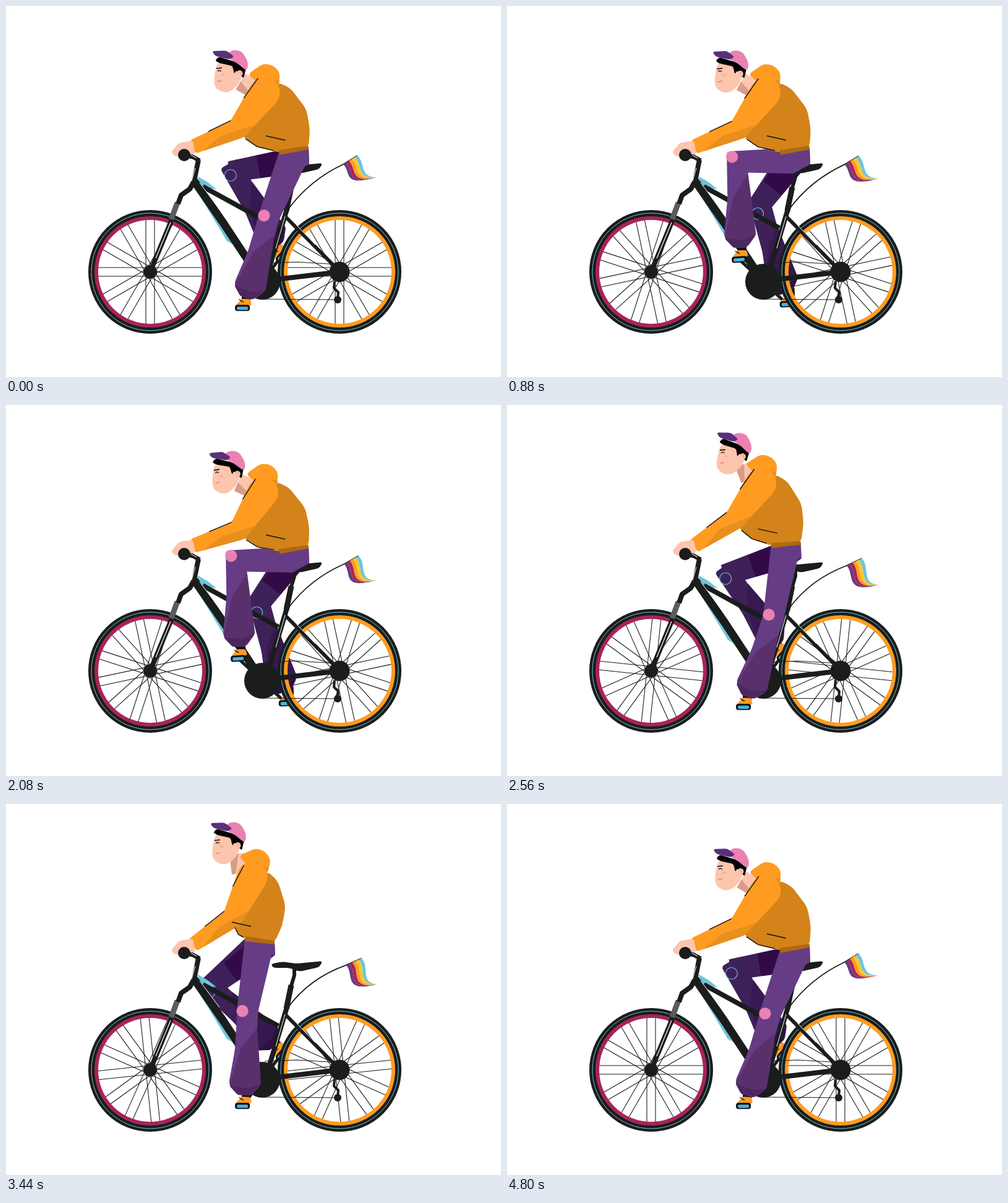
These frames come from a looping animation (800x600 px, 4.88 s). An HTML page with a canvas:

```html
<!DOCTYPE html>
<html lang="en">
<head>
<meta charset="utf-8">
<title>Cyclist</title>
<style>
html, body { margin: 0; width: 100%; height: 100%; overflow: hidden; background: #fff; }
canvas { display: block; width: 800px; height: 600px; }
</style>
</head>
<body>
<canvas id="stage" width="800" height="600"></canvas>
<script>
const ctx = document.getElementById('stage').getContext('2d');
const LOOP = 4880, STEP = 80, TAU = Math.PI * 2, RAD = Math.PI / 180;
const C = {
  black: '#1a1d1c', ink: '#111', blue: '#6cc5dd', pedal: '#45b4e6', magenta: '#a82458',
  orange: '#ff9b21', dark: '#d3831a', fold: '#e88f1e', hem: '#ad6a13', yellow: '#fcc72f',
  skin: '#fcc5ae', shade: '#d79d88', pink: '#ea81b2', brim: '#58307b', violet: '#6a3a82'
};
const NEAR = { main: '#663c85', low: '#59306c', hem: '#4d275f', knee: 8, top: -8 };
const FAR = { main: '#3f2159', low: '#371850', hem: '#2f1045', hip: '#330a48', knee: -6, top: -18 };
const CRANK = [414, 446], FRONT = [233, 430], REAR = [539, 430], GRIP = [288, 241], WRIST = [302, 228];

const clamp = v => Math.max(0, Math.min(1, v));
const mix = (a, b, k) => a + (b - a) * k;
const mixPt = (a, b, k) => [mix(a[0], b[0], k), mix(a[1], b[1], k)];
const add = (a, b, k = 1) => [a[0] + b[0] * k, a[1] + b[1] * k];
const gap = (a, b) => Math.hypot(b[0] - a[0], b[1] - a[1]);
const unit = (a, b) => add([0, 0], add(b, a, -1), 1 / (gap(a, b) || 1));
const side = u => [u[1], -u[0]];
const ramp = (t, a, b) => { const x = clamp((t - a) / (b - a)); return x * x * (3 - 2 * x); };

// Filled polygon with softened corners
function shape(color, pts, r = 0) {
  const n = pts.length;
  ctx.beginPath();
  pts.forEach((p, i) => {
    const near = q => mixPt(p, q, Math.min(r / (gap(p, q) || 1), 0.5));
    ctx.lineTo(...near(pts[(i + n - 1) % n]));
    ctx.quadraticCurveTo(...p, ...near(pts[(i + 1) % n]));
  });
  ctx.fillStyle = color;
  ctx.fill();
}

// Both edges of a limb along its joints, given half widths
function edges(joints, halves) {
  const edge = sign => joints.map((p, i) => {
    const u = unit(joints[Math.max(0, i - 1)], joints[Math.min(joints.length - 1, i + 1)]);
    return add(p, side(u), sign * halves[i]);
  });
  return [edge(1), edge(-1)];
}

function limb(color, joints, halves, r) {
  const [a, b] = edges(joints, halves);
  shape(color, [...a, ...b.reverse()], r);
}

function line(color, width, ...pts) {
  ctx.beginPath();
  pts.forEach(p => ctx.lineTo(...p));
  ctx.strokeStyle = color;
  ctx.lineWidth = width;
  ctx.lineJoin = 'round';
  ctx.stroke();
}

function oval(color, [x, y], rx, ry = rx, tilt = 0) {
  ctx.beginPath();
  ctx.ellipse(x, y, rx, ry, tilt, 0, TAU);
  ctx.fillStyle = color;
  ctx.fill();
}

function ring(color, width, [x, y], r, from = 0, to = TAU) {
  ctx.beginPath();
  ctx.arc(x, y, r, from, to);
  ctx.strokeStyle = color;
  ctx.lineWidth = width;
  ctx.stroke();
}

function within([x, y], angle, paint) {
  ctx.save();
  ctx.translate(x, y);
  ctx.rotate(angle);
  paint();
  ctx.restore();
}

// Middle joint of a two-bone chain
function bendAt(from, to, r1, r2, sign) {
  const d = gap(from, to), u = unit(from, to);
  const a = Math.min(r1, (d * d + r1 * r1 - r2 * r2) / (2 * d));
  return add(add(from, u, a), side(u), sign * Math.sqrt(r1 * r1 - a * a));
}

function poseAt(t) {
  const p = t / 960 % 1;
  const up = ramp(t, 2320, 2720) - ramp(t, 3440, 3920);
  const forth = ramp(t, 2400, 2880) - ramp(t, 3440, 3840);
  const dip = p < 0.45 ? 1 - Math.cos(Math.PI * p / 0.45) : 1 + Math.cos(Math.PI * (p - 0.45) / 0.55);
  const bob = dip / 2 * (1 - up);
  const crank = 127 - (t < 2400 ? 0.3 * t : 0.375 * Math.max(0, t - 3840) + 720);
  const arm = [53 * Math.cos(crank * RAD), 53 * Math.sin(crank * RAD)];
  const hip = [464 - 55 * forth, 250 - 12 * up], tilt = 4 - 7 * forth;
  const shoulder = [418 - 20 * forth - 9 * bob, 140 - 22 * up + 4 * bob];
  return {
    up, bob, crank, hip, shoulder,
    wave: p * TAU, spin: -TAU * t / 2400,
    elbow: bendAt(shoulder, WRIST, 74, 77, 1),
    waist: [add(hip, [-23, tilt - 17]), add(hip, [25, -tilt - 17])],
    near: add(CRANK, arm), far: add(CRANK, arm, -1)
  };
}

function wheel(hub, rim, spin) {
  within(hub, spin, () => {
    for (let i = 0; i < 6; i++) {
      ctx.rotate(TAU / 12);
      for (const x of [-7, 7]) line(C.black, 1.1, [x, -84], [x, 84]);
    }
  });
  ring(C.black, 11, hub, 94.5);
  ring(C.blue, 1, hub, 95);
  ring(rim, 6, hub, 87);
}

function frame() {
  const b = C.black, head = [304, 283], seat = [466, 266], joint = [453, 331], mech = [536, 475];
  line(b, 1.1, [418, 416], [470, 414], [538, 418]);
  line(b, 1.1, [416, 474], mech);
  line(b, 4, [531, 445], [530, 456], [537, 463], mech);
  oval(b, mech, 6);
  oval(b, REAR, 16.5);
  oval(b, FRONT, 11);
  line(b, 8, [430, 443], REAR);
  line(b, 6, [450, 339], [530, 420]);
  line('#fff', 1, [470, 355], [500, 386]);
  // fork and stem
  line(b, 8, [271, 338], FRONT);
  line('#fff', 1.2, [266, 350], [242, 408]);
  line('#5c5c5c', 9, [277, 318], [267, 345]);
  line(b, 8, [311, 249], head, [297, 296], [283, 306], [278, 320]);
  line('#fff', 1, [306, 262], [300, 283]);
  // main tubes
  shape(C.blue, [[300, 285], [309, 290], [371, 388], [357, 380]]);
  shape(C.blue, [[309, 275], [326, 285], [340, 296], [316, 294]]);
  line(b, 8, [318, 292], [380, 326], [440, 359]);
  line(b, 13, head, [352, 352], CRANK);
  line('#fff', 1, [313, 286], [345, 329]);
  line(b, 8, [456, 322], [425, 425]);
  line(b, 6, seat, [466, 277], [461, 294], joint);
  line(b, 9, [461, 293], joint);
  line('#fff', 1, [451, 340], [436, 392]);
  shape(b, [[428, 259], [445, 255], [470, 258], [512, 254], [506, 264], [474, 271], [458, 265], [432, 265]], 5);
}

function flag(s) {
  const lift = (1 - Math.cos(s.wave)) / 2;
  const low = add([545, 256], [5, 5], lift), top = add([568, 242], [7, 8], lift);
  const tip = [600 - 2 * Math.sin(s.wave), 286 - 7 * Math.cos(s.wave) - 2 * Math.cos(2 * s.wave)];
  ctx.beginPath();
  ctx.moveTo(455, 330);
  ctx.quadraticCurveTo(490, 282, ...low);
  ctx.lineTo(...top);
  ctx.strokeStyle = C.black;
  ctx.lineWidth = 1.8;
  ctx.stroke();
  const colors = [C.violet, C.magenta, C.orange, C.yellow, C.blue];
  const edge = k => {
    const base = mixPt(low, top, k);
    return [base, add(base, [14, 13]), add(tip, [mix(-58, -30, k), mix(16, 0, k)]), tip];
  };
  colors.forEach((color, i) => {
    const a = edge(i / colors.length), b = edge((i + 1) / colors.length);
    ctx.beginPath();
    ctx.moveTo(...a[0]);
    ctx.bezierCurveTo(...a[1], ...a[2], ...a[3]);
    ctx.bezierCurveTo(...b[2], ...b[1], ...b[0]);
    ctx.fillStyle = color;
    ctx.fill();
  });
}

function foot(pos, crank) {
  const tilt = -50 * ((1 + Math.cos((crank - 310) * RAD)) / 2) ** 4;
  within(pos, tilt * RAD, () => {
    limb(C.ink, [[6, -26], [6, -12]], [7, 7]);
    shape(C.orange, [[-11, -4], [-1, -15], [13, -14], [15, -4]], 3);
    for (const x of [-3, -6]) line(C.ink, 1.2, [x, x * 0.8 - 9], [x + 5, x * 0.8 - 7]);
    limb(C.ink, [[-12, 0], [12, 0]], [5, 5], 4);
    limb(C.pedal, [[-9, 0.5], [9, 0.5]], [2.7, 2.7], 2);
  });
}

function leg(s, isNear) {
  const { hip } = s, col = isNear ? NEAR : FAR;
  const pos = isNear ? s.near : s.far, crank = isNear ? s.crank : s.crank + 180;
  const reach = isNear ? 162.6 - 9.5 * Math.cos((crank - 110) * RAD) : 154;
  const knee = bendAt(hip, pos, isNear ? 100.5 : 104, reach, -1);
  const back = side(unit(hip, knee)), down = unit(knee, pos), len = gap(knee, pos) / 160;
  const at = (x, y) => add(add(knee, side(down), x), down, y * len);
  const thighEnd = add(knee, back, col.knee), under = add(hip, back, 21);

  line(C.black, 5, CRANK, pos);
  foot(pos, crank);
  limb(col.main, [hip, thighEnd], [21, 17], 3);
  shape(col.main, [s.waist[0], add(thighEnd, back, -17), under, add(hip, [26, 6]), s.waist[1]]);
  if (!isNear) limb(col.hip, [mixPt(hip, thighEnd, 0.1), mixPt(hip, thighEnd, 0.55)], [20.5, 18.5]);
  // bell-bottom shin
  limb(col.main, [at(9, col.top), at(5, 65), at(4, 123), at(3, 142)], [17, 17, 26, 11], 6);
  shape(col.low, [at(24, 28), at(30, 123), at(12, 142), at(-8, 141), at(-21, 125), at(-3, 64)], 3);
  shape(col.hem, [at(-21, 126), at(-8, 141), at(12, 142), at(30, 123), at(8, 130)], 2);
  if (isNear) oval(C.pink, knee, 9.7);
  else ring(C.blue, 1.1, knee, 9.5);
}

// Head and neck; drawn around the temple
function head(s) {
  const mid = 4 * s.up * (1 - s.up);
  const pos = [364 - 13.6 * s.bob - 3 * s.up + 10 * mid, 100 + 10.6 * s.bob - 42 * s.up - 2 * mid];
  const nape = add(pos, [15, 22]), collar = add(s.shoulder, [-18, -6]);
  limb(C.skin, [nape, collar], [15, 15]);
  const [, jaw] = edges([nape, collar], [15, 15]);
  shape(C.shade, [jaw[0], nape, mixPt(jaw[1], collar, 0.4), jaw[1]]);
  within(pos, (7 * mid - 10.6 * s.bob) * RAD, () => {
    shape(C.skin, [[-22, -12], [-28, 15], [-27, 33], [-8, 42], [10, 30], [20, 8], [18, -6]], 11);
    shape('#000', [[-26, -12], [-20, -18], [25, -4], [20, 17], [8, 4], [5, 10], [2, -3], [-20, -8]], 3);
    oval(C.skin, [13.5, 9], 5);
    line(C.shade, 0.9, [11, 8], [15, 6], [15, 11]);
    shape(C.pink, [[-9, -17], [-1, -29], [17, -28], [28, -8], [25, 6], [10, -8]], 9);
    shape(C.brim, [[-31, -27], [-8, -28], [5, -18], [-3, -14], [-26, -19]], 4);
    line(C.ink, 1.7, [-24, 1], [-15, 0]);
    ring(C.ink, 1.2, [-19, 7], 2.8, 3.5, 5.9);
    ring('#c9555c', 1, [-20, 18], 4, 0.4, 2.2);
    oval('#f9b3a5', [-13, 11], 3.5, 2);
  });
}

function jacket(s) {
  const { shoulder, elbow, waist: [left, right] } = s;
  const spine = unit(shoulder, right), out = side(spine);
  const back = (k, bulge) => add(mixPt(shoulder, right, k), out, bulge);
  const belly = add(mixPt(left, elbow, 0.8), [0, 8]);
  shape(C.dark, [back(0, -12), back(0, 27), back(0.18, 37), back(0.55, 36), back(0.8, 21), right, left, add(mixPt(belly, left, 0.35), [0, 6]), belly, elbow], 9);
  limb(C.hem, [mixPt(left, right, 0.01), right], [4, 3]);

  const lean = (Math.atan2(spine[1], spine[0]) / RAD - 52) / 2;
  within(shoulder, lean * RAD, () => {
    shape(C.orange, [[-27, -30], [-2, -47], [14, -44], [25, -32], [23, -8], [-6, -12]], 7);
    shape(C.fold, [[-9, -19], [24, -20], [23, -12], [6, -13]], 3);
  });

  const joints = [shoulder, elbow, WRIST], halves = [25, 17, 11.5];
  const [lower, upper] = edges(joints, halves).sort((a, b) => b[1][1] - a[1][1]);
  oval(C.orange, shoulder, 24.5);
  limb(C.orange, joints, halves, 4);
  shape(C.fold, [mixPt(lower[1], lower[2], 0.85), mixPt(elbow, WRIST, 0.35), mixPt(lower[0], lower[1], 0.65), lower[1]], 3);

  const pen = (...pts) => line(C.ink, 1.4, ...pts);
  pen(mixPt(upper[2], upper[1], 0.45), upper[1]);
  pen(mixPt(upper[1], upper[0], 0.6), add(upper[0], [9, -8]));
  pen(add(left, [-21, -27]), add(left, [10, -20]));
  pen(belly, add(mixPt(belly, left, 0.35), [0, 5]), mixPt(belly, left, 0.85));
}

function hand() {
  shape(C.skin, [[302, 218], [280, 221], [267, 236], [272, 243], [286, 244], [306, 239]], 4);
  line(C.black, 7, GRIP, [302, 244], [313, 250]);
  line('#fff', 1, [299, 241], [308, 246]);
  oval(C.black, GRIP, 10);
}

function draw(t) {
  const s = poseAt(t);
  ctx.fillStyle = '#fff';
  ctx.fillRect(0, 0, 800, 600);
  leg(s, false);
  wheel(FRONT, C.magenta, s.spin);
  wheel(REAR, C.orange, s.spin);
  flag(s);
  frame();
  oval(C.black, CRANK, 29);
  leg(s, true);
  head(s);
  jacket(s);
  hand();
}

const start = performance.now();
function tick() {
  const t = (performance.now() - start) % LOOP;
  draw(Math.floor(t / STEP) * STEP);
  requestAnimationFrame(tick);
}
tick();
</script>
</body>
</html>
```
